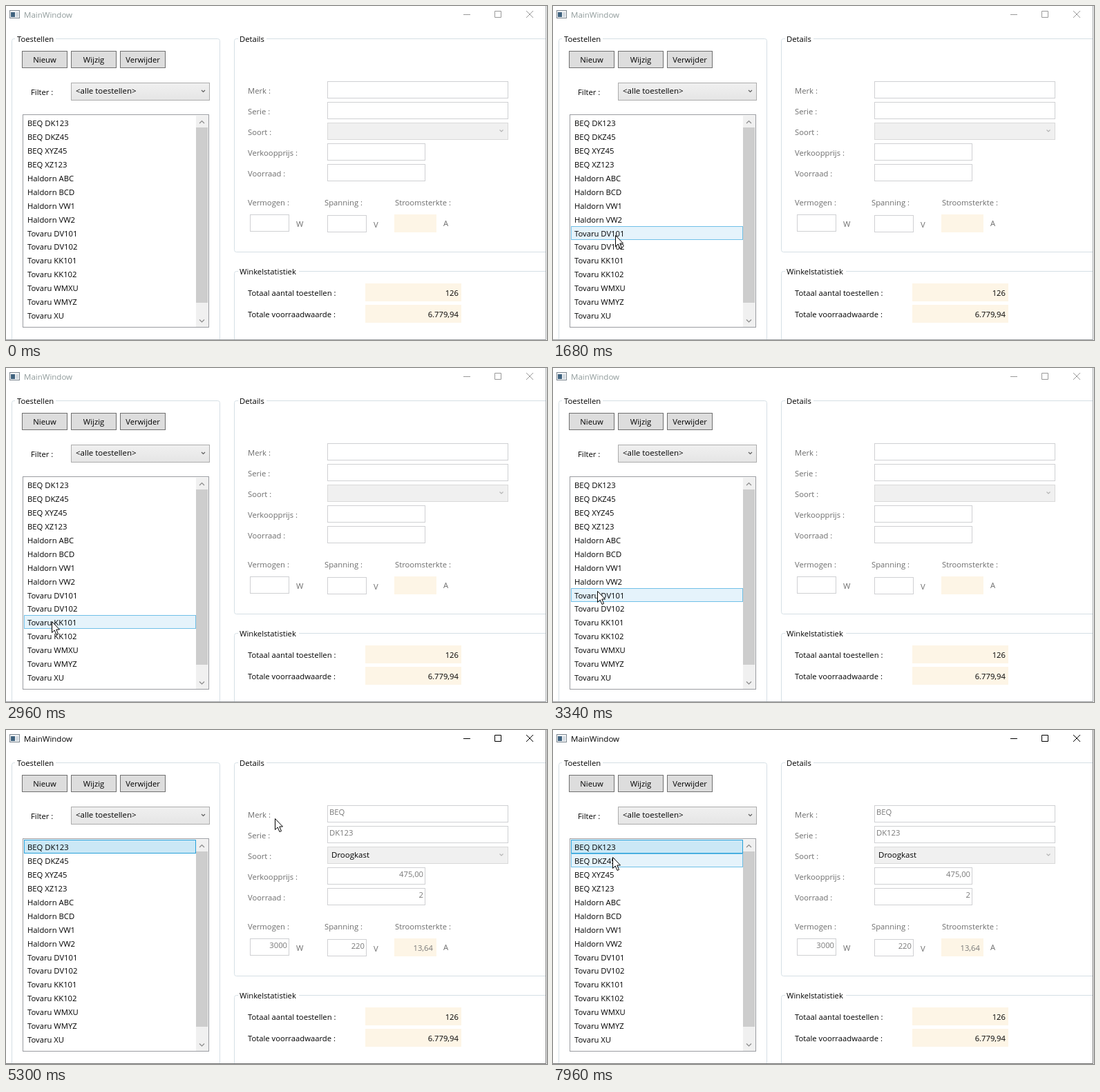
An HTML page that plays this animation: 783 by 484 pixels, repeating every 8 s.

```html
<!DOCTYPE html>
<html lang="nl">
<head>
<meta charset="utf-8">
<title>MainWindow</title>
<style>
  html, body { margin: 0; width: 100%; height: 100%; overflow: hidden; background: #fff; }
  svg { display: block; width: 783px; height: 484px; }
  text { font: 11.25px "Open Sans", "Noto Sans", sans-serif; fill: #000; white-space: pre; }
  .large { font-size: 11.5px; }
  .end { text-anchor: end; }
  .mid { text-anchor: middle; }
  .dim text { fill: #6d6d6d; }
  .value text { fill: #787878; }
  .value .strong { fill: #000; }
  .line { fill: none; stroke: #d5dfe5; }
  .button { fill: #ddd; stroke: #707070; }
  .field { fill: #fff; stroke: #cfd0d3; }
  .result { fill: #fdf5e6; }
  .combo { fill: url(#grey); stroke: #acacac; }
  .combo.over { fill: url(#blue); stroke: #7eb4ea; }
  .combo.off { fill: #f0f0f0; stroke: #d9d9d9; }
  .arrow { fill: none; stroke: #606060; stroke-width: 1.2; }
  .arrow.soft { stroke: #8a8a8a; }
  .arrow.off { stroke: #b5b5b5; }
  .hover { fill: #e5f3fb; stroke: #70c0e7; }
  .selected { fill: #cbe8f6; stroke: #26a0da; }
  .frame { fill: none; stroke: #a0a3a6; }
  .caption text { fill: #8f9a9a; }
  .caption path { fill: none; stroke: #999; }
  .active .frame { stroke: #707070; }
  .active .caption text { fill: #000; }
  .active .caption path { stroke: #000; }
</style>
</head>
<body>
<svg id="stage" viewBox="0 0 783 484">
  <defs>
    <linearGradient id="grey" x2="0" y2="1"><stop stop-color="#f0f0f0"/><stop offset="1" stop-color="#e5e5e5"/></linearGradient>
    <linearGradient id="blue" x2="0" y2="1"><stop stop-color="#ecf4fc"/><stop offset="1" stop-color="#dcecfc"/></linearGradient>
  </defs>
  <rect width="783" height="484" fill="#fff"/>

  <g class="caption">
    <rect x="5.5" y="6.5" width="14" height="11" fill="#f4f6f8" stroke="#7d8790"/>
    <rect x="7" y="9" width="6" height="7" fill="#40637f"/>
    <rect x="14" y="9" width="4" height="7" fill="#d3dae0"/>
    <text class="large" x="26" y="17">MainWindow</text>
    <path d="M662 12.5h10M707.5 7.5h9v9h-9zM753 7l10 10M763 7l-10 10"/>
  </g>

  <path class="line" d="M13 47.5h-1.5a3 3 0 0 0-3 3V490M72 47.5h234.5a3 3 0 0 1 3 3V490"/>
  <path class="line" d="M336 47.5h-2.5a3 3 0 0 0-3 3v303a3 3 0 0 0 3 3H781M377 47.5H781"/>
  <path class="line" d="M336 384.5h-2.5a3 3 0 0 0-3 3V490M424 384.5H781"/>
  <text x="16" y="52">Toestellen</text>
  <text x="338" y="52">Details</text>
  <text x="338" y="389">Winkelstatistiek</text>

  <g id="buttons"></g>

  <text x="36" y="129">Filter :</text>
  <rect id="filter" class="combo" x="94.5" y="111.5" width="200" height="25"/>
  <text class="large" x="101" y="127">&lt;alle toestellen&gt;</text>
  <path class="arrow" d="M283 122l2.5 2.5 2.5-2.5"/>

  <rect x="24.5" y="157.5" width="269" height="308" fill="#fff" stroke="#9a9ca1"/>
  <rect x="275" y="159" width="18" height="306" fill="#f0f0f0"/>
  <rect x="275" y="176" width="17" height="254" fill="#cdcdcd"/>
  <path class="arrow soft" d="M280 170l3.5-3.5 3.5 3.5M280 454.5l3.5 3.5 3.5-3.5"/>
  <rect id="selected" class="selected" x="26.5" y="159.5" width="248" height="19"/>
  <rect id="hover" class="hover" x="26.5" width="248" height="19"/>
  <g id="list"></g>

  <g id="form" class="dim"></g>
  <path class="arrow off" d="M714.5 179.5l2.5 2.5 2.5-2.5"/>
  <g class="field">
    <rect x="353.5" y="302.5" width="56" height="24"/>
    <rect x="465.5" y="303.5" width="56" height="24"/>
  </g>
  <g class="result">
    <rect x="562" y="302" width="61" height="26"/>
    <rect x="520" y="402" width="139" height="26"/>
    <rect x="520" y="433" width="139" height="26"/>
  </g>
  <g class="dim">
    <text x="350" y="289">Vermogen :</text>
    <text x="461" y="289">Spanning :</text>
    <text x="563" y="289">Stroomsterkte :</text>
    <text x="420" y="320">W</text>
    <text x="532" y="321">V</text>
    <text x="633" y="319">A</text>
  </g>
  <g id="values" class="value">
    <text x="468" y="123">BEQ</text>
    <text x="468" y="153">DK123</text>
    <text class="large strong" x="471" y="185">Droogkast</text>
    <g class="end">
      <text x="604" y="213">475,00</text>
      <text x="604" y="243">2</text>
      <text x="407" y="316">3000</text>
      <text x="519" y="317">220</text>
      <text x="618" y="320">13,64</text>
    </g>
  </g>

  <text x="350" y="420">Totaal aantal toestellen :</text>
  <text x="350" y="451">Totale voorraadwaarde :</text>
  <text class="end" x="655" y="420">126</text>
  <text class="end" x="655" y="451">6.779,94</text>

  <path class="frame" d="M0 483.5H781.5V0"/>
  <path id="cursor" d="M.5.5v16L4.2 13 7 19.5l2.5-1.1L6.8 12h4.700z" fill="#fff" stroke="#000"/>
</svg>
<script>
  const LOOP = 8000, STEP = 77;
  const ENTER = 990, ACTIVATE = 4130, PICK = 4200;
  const LIST_TOP = 159, PITCH = 19.94;
  const $ = id => document.getElementById(id);

  const box = (kind, x, y, w, h) =>
    `<rect class="${kind}" x="${x + 0.5}" y="${y + 0.5}" width="${w}" height="${h}"/>`;
  const label = (text, x, y, kind = "") => `<text class="${kind}" x="${x}" y="${y}">${text}</text>`;

  $("buttons").innerHTML = ["Nieuw", "Wijzig", "Verwijder"].map((name, i) => {
    const x = 23 + 71 * i;
    return box("button", x, 65, 65, 24) + label(name, x + 33, 82, "mid");
  }).join("");

  $("form").innerHTML = ["Merk", "Serie", "Soort", "Verkoopprijs", "Voorraad"].map((name, i) => {
    const y = 109 + 30 * i;
    const kind = name === "Soort" ? "combo off" : "field";
    return box(kind, 465, y, i < 3 ? 261 : 141, 24) + label(name + " :", 350, y + 18);
  }).join("");

  const models = {
    BEQ: "DK123 DKZ45 XYZ45 XZ123",
    Haldorn: "ABC BCD VW1 VW2",
    Tovaru: "DV101 DV102 KK101 KK102 WMXU WMYZ XU"
  };
  const items = Object.entries(models)
    .flatMap(([brand, series]) => series.split(" ").map(s => `${brand} ${s}`));
  const rowTop = i => Math.round(LIST_TOP + i * PITCH);
  $("list").innerHTML = items.map((name, i) => label(name, 31, rowTop(i) + 15)).join("");

  // Turning points of the pointer; it eases from one to the next.
  const turns = [
    { t: ENTER, x: 130, y: 453 },
    { t: 1270, x: 106, y: 122 },
    { t: 1990, x: 80, y: 463 },
    { t: 2380, x: 66, y: 168 },
    { t: 3130, x: 66, y: 413 },
    { t: 3500, x: 62, y: 206 },
    { t: 3900, x: 60, y: 177 },
    { t: 4820, x: 60, y: 177 },
    { t: 5320, x: 390, y: 128 },
    { t: 5690, x: 522, y: 199 },
    { t: 6000, x: 450, y: 270 },
    { t: 6800, x: 598, y: 453 },
    { t: 6950, x: 638, y: 435 },
    { t: 7640, x: 100, y: 204 },
    { t: 7960, x: 85, y: 183 }
  ];

  const ease = k => (1 - Math.cos(Math.PI * k)) / 2;
  const mix = (a, b, k) => Math.round(a + (b - a) * k);

  function pointerAt(time) {
    const t = ENTER + STEP * Math.floor((time - ENTER) / STEP + 0.1);
    const next = Math.max(1, turns.findIndex(p => p.t >= t));
    const a = turns[next - 1], b = turns[next];
    const k = ease(Math.max(0, (t - a.t) / (b.t - a.t)));
    return { x: mix(a.x, b.x, k), y: mix(a.y, b.y, k) };
  }

  const show = (id, on) => $(id).setAttribute("visibility", on ? "visible" : "hidden");

  function draw(time) {
    const visible = time >= ENTER, picked = time >= PICK;
    const { x, y } = pointerAt(time);
    const row = Math.floor((y - LIST_TOP) / PITCH);
    const overRow = visible && x >= 26 && x < 275 && row >= 0 && row < items.length;

    show("cursor", visible);
    $("cursor").setAttribute("transform", `translate(${x} ${y})`);
    show("hover", overRow && !(picked && row === 0));
    if (overRow) $("hover").setAttribute("y", rowTop(row) + 0.5);
    $("filter").classList.toggle("over", visible && x >= 94 && x < 295 && y >= 111 && y < 137);
    show("selected", picked);
    show("values", picked);
    $("stage").classList.toggle("active", time >= ACTIVATE);
  }

  const start = performance.now();
  function tick() {
    draw((performance.now() - start) % LOOP);
    requestAnimationFrame(tick);
  }
  tick();
</script>
</body>
</html>
```
